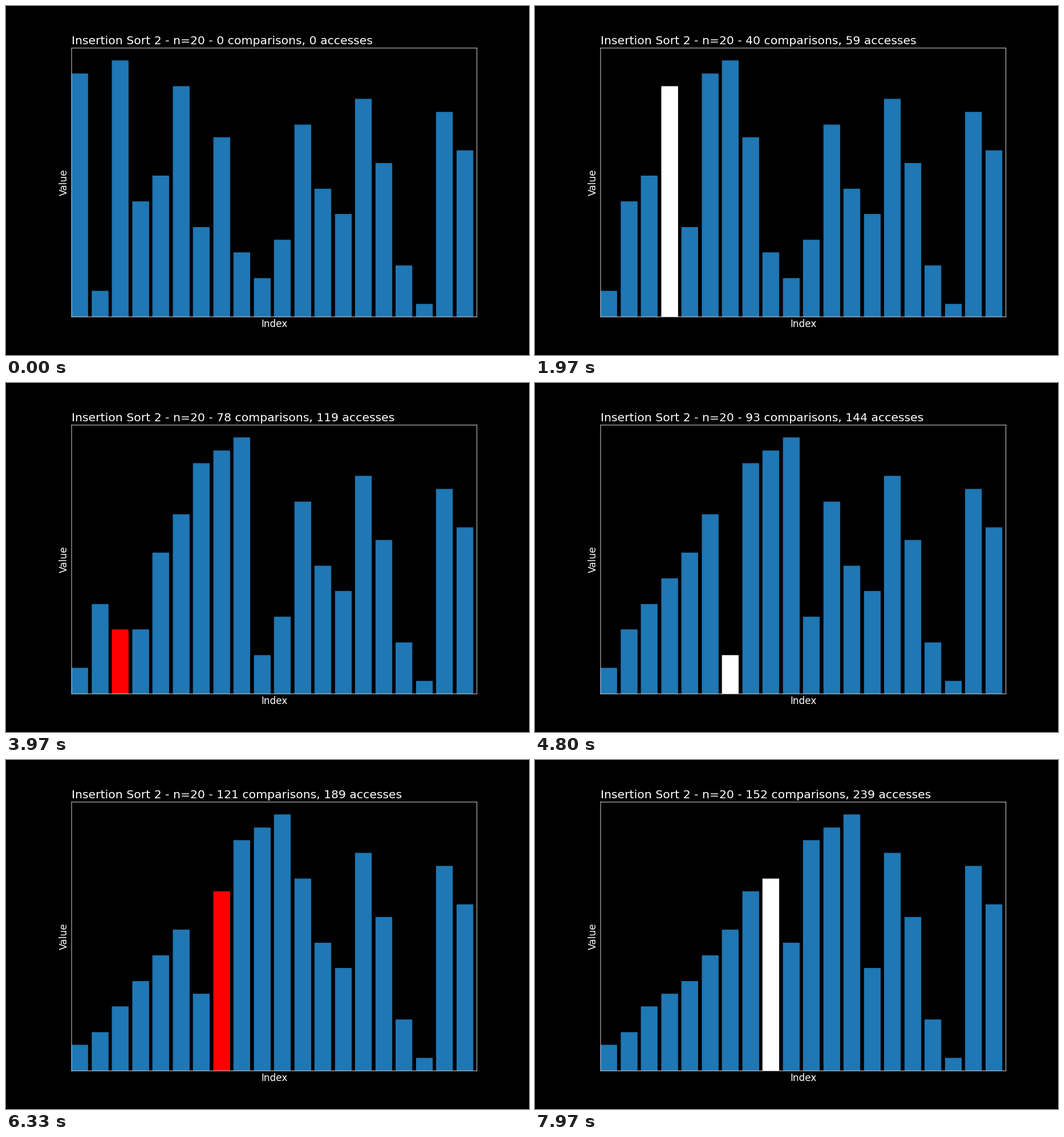
Recreate the animation shown at these times as a matplotlib script. Size 917 px wide and 611 px high, loop 8 s.

```python
import numpy as np
import matplotlib.pyplot as plt
from matplotlib.animation import FuncAnimation

WIDTH, HEIGHT, DPI = 917, 611, 64
# The layout is designed on a 1200 x 800 canvas at 100 dpi.
BASE_W, BASE_H = 1200, 800
K = WIDTH / BASE_W * 100 / DPI      # scales point sizes to this figure
PLOT_W, PLOT_H = 930, 616           # plot area in canvas pixels

FRAMES, FPS = 240, 30
BLUE, READ, WRITE = "#1f77b4", "white", "red"
VALUES = [19, 2, 20, 9, 11, 18, 7, 14, 5, 3,
          6, 15, 10, 8, 17, 12, 4, 1, 16, 13]
N = len(VALUES)


class TrackedList:
    """List that logs each access as (state, index, colour, earlier reads)."""

    def __init__(self, items):
        self.items = list(items)
        self.reads = 0
        self.log = [(tuple(items), None, None, 0)]

    def record(self, i, color):
        self.log.append((tuple(self.items), i, color, self.reads))

    def __getitem__(self, i):
        self.record(i, READ)
        self.reads += 1
        return self.items[i]

    def __setitem__(self, i, value):
        self.items[i] = value
        self.record(i, WRITE)


def insertion_sort(a):
    for i in range(N):
        key, j = a[i], i
        while j > 0 and a[j - 1] > key:
            a[j - 1], a[j] = a[j], a[j - 1]
            j -= 1


def snap(v):
    return np.floor(v + 0.5)


tracked = TrackedList(VALUES)
insertion_sort(tracked)
log = tracked.log

plt.style.use("dark_background")
plt.rcParams.update({
    "font.family": "DejaVu Sans",
    "font.size": 16 * K,
    "axes.linewidth": 0.8 * K,
    "axes.titlepad": 6 * K,
    "axes.labelpad": 4 * K,
})

fig = plt.figure(figsize=(WIDTH / DPI, HEIGHT / DPI), dpi=DPI)
ax = fig.add_axes((150.5 / BASE_W, 87.5 / BASE_H,
                   PLOT_W / BASE_W, PLOT_H / BASE_H))
ax.set(xlim=(0, PLOT_W), ylim=(0, PLOT_H), xticks=[], yticks=[],
       xlabel="Index", ylabel="Value")
for spine in ax.spines.values():
    spine.set_snap(False)

slot = PLOT_W / N
unit = PLOT_H / (N * 1.05)
left = snap(slot * np.arange(N))
right = snap(slot * (np.arange(N) + 0.8))
bars = ax.bar(left, snap(unit * np.array(VALUES)), right - left, align="edge",
              color=BLUE, edgecolor=BLUE, linewidth=K, snap=False)
ax.set(xlim=(0, PLOT_W), ylim=(0, PLOT_H))
title = ax.set_title("", loc="left")


def update(frame):
    state, active, color, reads = log[frame]
    for i, (bar, value) in enumerate(zip(bars, state)):
        bar.set_height(snap(unit * value))
        bar.set_color(color if i == active else BLUE)
    title.set_text(f"Insertion Sort 2 - n={N} - "
                   f"{reads} comparisons, {frame} accesses")
    return [*bars, title]


anim = FuncAnimation(fig, update, frames=FRAMES, interval=1000 / FPS,
                     repeat=True, repeat_delay=0)
plt.show()
```
